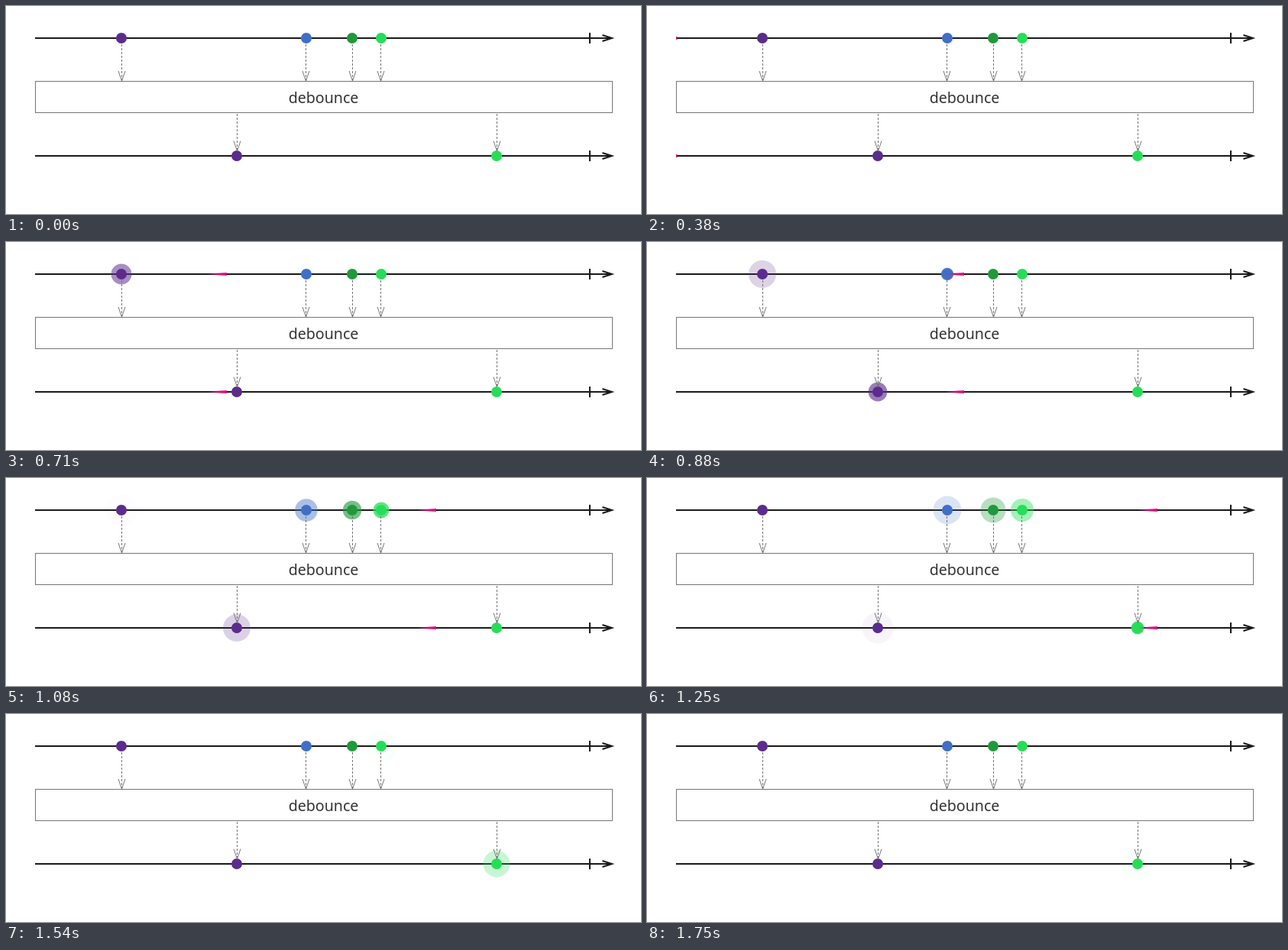
Write an HTML page with a canvas that moves like this. It is 831 px wide and 272 px high and loops after 2.12 s.

```html
<!DOCTYPE html>
<html lang="en">
<head>
<meta charset="utf-8">
<title>debounce marble diagram</title>
<style>
  html, body { margin: 0; width: 100%; height: 100%; overflow: hidden; background: #fff; }
  canvas { display: block; }
</style>
</head>
<body>
<canvas id="stage" width="831" height="272"></canvas>
<script>
const ctx = document.getElementById('stage').getContext('2d');
const LOOP = 2120, START = 380, STEP = 1000 / 24, LAST_STEP = 33;
const LEFT = 38, RIGHT = 764, TOP = 42, BOTTOM = 196;
const INK = '#1a1a1a', GRAY = '#757575', PINK = '224,14,126';
const PURPLE = '#5b2c8c', BLUE = '#3f70c6', GREEN = '#20993b', LIME = '#27dd58';

const marbles = [
  [151, TOP, PURPLE], [393, TOP, BLUE], [453, TOP, GREEN], [491, TOP, LIME],
  [302, BOTTOM, PURPLE], [642, BOTTOM, LIME]
];

// Sweep keys: [step, x of the comet's head]
const sweep = [[0, 39.5], [4, 163], [12, 415], [17, 563], [21, 668], [24, 762], [34, 1071]];

function headAt(step) {
  const i = sweep.findIndex(key => key[0] > step);
  const [s0, x0] = sweep[i - 1], [s1, x1] = sweep[i];
  return x0 + (x1 - x0) * (step - s0) / (s1 - s0);
}

function polyline(points, color, width, dash = []) {
  ctx.strokeStyle = color;
  ctx.lineWidth = width;
  ctx.setLineDash(dash);
  ctx.beginPath();
  points.forEach(([x, y]) => ctx.lineTo(x, y));
  ctx.stroke();
}

function disc(x, y, r, color, alpha = 1) {
  ctx.globalAlpha = alpha;
  ctx.fillStyle = color;
  ctx.beginPath();
  ctx.arc(x, y, r, 0, 2 * Math.PI);
  ctx.fill();
  ctx.globalAlpha = 1;
}

function timeline(y) {
  polyline([[LEFT, y], [793, y]], INK, 2);
  polyline([[780.5, y - 4], [793, y], [780.5, y + 4]], INK, 2);
  polyline([[RIGHT, y - 7], [RIGHT, y + 7]], INK, 2);
}

function dashedArrow(x, from, to) {
  polyline([[x, from], [x, to]], GRAY, 1, [3, 2]);
  polyline([[x - 4.5, to - 13], [x, to], [x + 4.5, to - 13]], GRAY, 1);
}

// The halo grows and fades once the comet's head has reached the marble
function halo(x, y, color, head) {
  const p = (head - x + 3) / 460;
  if (p <= 0 || p >= 1) return;
  const eased = Math.sin(p * Math.PI / 2);
  disc(x, y, 7 + 14 * eased, color, 1 - eased);
}

function comet(head, y) {
  const tail = head - 26;
  const fade = ctx.createLinearGradient(tail, 0, head, 0);
  fade.addColorStop(0, `rgba(${PINK},0)`);
  fade.addColorStop(0.6, `rgba(${PINK},0.9)`);
  fade.addColorStop(1, `rgb(${PINK})`);
  ctx.save();
  ctx.beginPath();
  ctx.rect(LEFT, y - 3, RIGHT - LEFT, 6);
  ctx.clip();
  ctx.fillStyle = fade;
  ctx.beginPath();
  ctx.moveTo(tail, y - 0.5);
  ctx.lineTo(head, y - 2);
  ctx.lineTo(head, y + 2);
  ctx.lineTo(tail, y + 0.5);
  ctx.fill();
  ctx.restore();
}

function draw(time) {
  // 24 steps per second, with step times cut to 10 ms
  const tick = Math.floor(time / 10) * 10 + 9.99;
  const step = Math.min(LAST_STEP, Math.floor((tick - START) / STEP));
  const head = step < 0 ? 0 : headAt(step);

  ctx.fillStyle = '#fff';
  ctx.fillRect(0, 0, 831, 272);
  timeline(TOP);
  timeline(BOTTOM);
  ctx.setLineDash([]);
  ctx.lineWidth = 1;
  ctx.strokeStyle = GRAY;
  ctx.strokeRect(38.5, 98.5, 755, 41);
  ctx.fillStyle = '#333';
  ctx.font = '500 19.6px "Noto Sans", "Open Sans", sans-serif';
  ctx.textAlign = 'center';
  ctx.fillText('debounce', 415.5, 127);

  for (const [x, y, color] of marbles) halo(x, y, color, head);
  for (const [x, y, color] of marbles) {
    disc(x, y, 7, color);
    const lane = Math.floor(x) + (x === 491 || x === 393 ? -0.5 : 0.5);
    if (y === TOP) dashedArrow(lane, 50, 98);
    else dashedArrow(lane, 141, 189.5);
  }
  if (head > LEFT) {
    comet(head, TOP);
    comet(head, BOTTOM);
  }
}

const begin = performance.now();
function loop() {
  draw((performance.now() - begin) % LOOP);
  requestAnimationFrame(loop);
}
loop();
</script>
</body>
</html>
```
